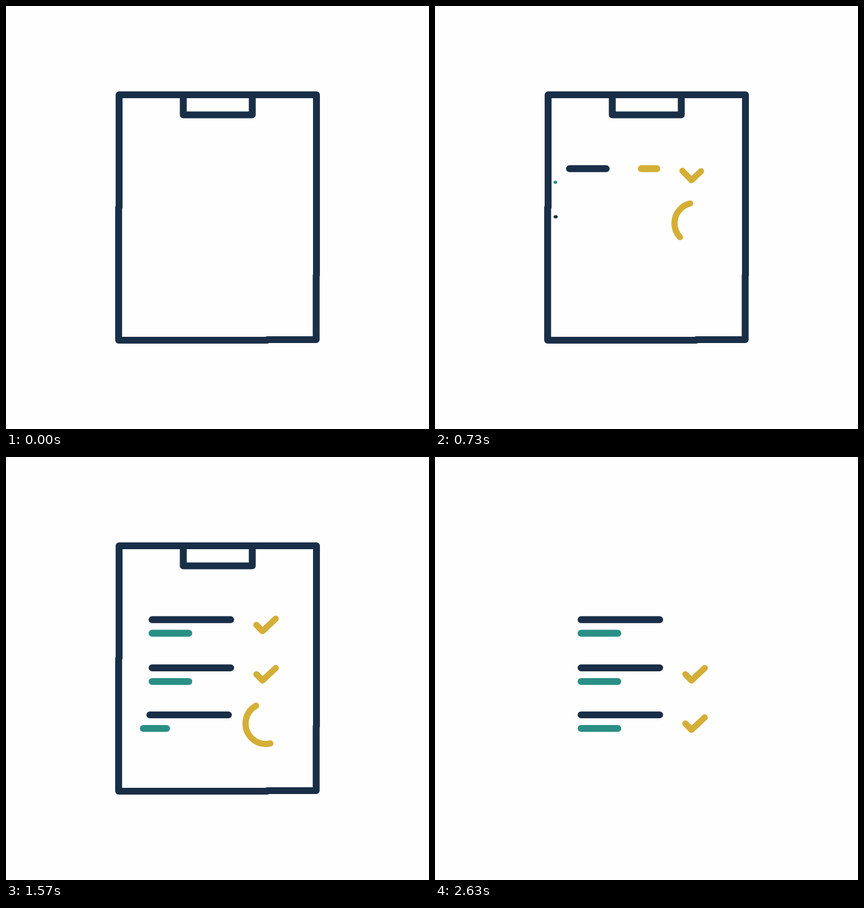
Animation, 748 px wide and 748 px high, one loop 3030 ms. Source, as an HTML page:

```html
<!DOCTYPE html>
<html lang="en">
<head>
<meta charset="utf-8">
<title>Checklist</title>
<style>
  html, body { margin: 0; width: 100%; height: 100%; overflow: hidden; background: #fefefe; }
  svg { display: block; width: 100vw; height: 100vh; }
  path { fill: none; stroke-linecap: round; stroke-linejoin: round; }
  .navy { stroke: #192e47; }
  .teal { stroke: #2a8f84; }
  .gold { stroke: #d4af37; }
  .check { stroke-width: 11; }
  #board { stroke-width: 12.2; animation: board 3030ms step-end infinite; }
  @keyframes board {
    0% { visibility: visible; }
    86.8%, 100% { visibility: hidden; }
  }
</style>
</head>
<body>
<svg id="stage" viewBox="0 0 748 748">
  <g id="items"></g>
  <g id="board">
    <path class="navy" d="M200 157H549V476H548.5V590H462V591H199.2V356H200Z"/>
    <path class="navy" d="M313.5 157V192.5H435.5V157"/>
  </g>
</svg>
<script>
const LOOP = 3030;
const ENTRY = 210;
const items = document.getElementById('items');
const clamp = v => Math.min(1, Math.max(0, v));
const mix = (a, b, p) => a + (b - a) * p;
const easeOut = (u, power) => 1 - (1 - u) ** power;

function addPath(cls) {
  const el = document.createElementNS('http://www.w3.org/2000/svg', 'path');
  el.setAttribute('class', cls);
  items.append(el);
  return el;
}

function show(el, on) {
  el.style.visibility = on ? 'visible' : 'hidden';
}

// Bars: colour, y, full length, start, duration
const bars = [
  ['navy', 287.7, 139, 498, 669],
  ['teal', 311.7, 65, 716, 573],
  ['navy', 372.8, 139, 716, 573],
  ['teal', 397, 65, 907, 650],
  ['navy', 456, 139, 1052, 728],
  ['teal', 480, 65, 1268, 700]
].map(([cls, y, length, start, duration]) =>
  ({ el: addPath(cls), y, length, start, duration }));

function drawBar({ el, y, length, start, duration }, t) {
  const u = clamp((t - start) / duration);
  show(el, u > 0);
  const x = mix(ENTRY, 258.3, easeOut(u, 2));
  const grow = Math.min(1, (u / 0.6) ** 1.4);
  el.setAttribute('d', `M${x} ${y}h${Math.max(0.01, length * grow)}`);
  el.style.strokeWidth = 12.2 * Math.min(1, 0.3 + u * 6);
}

const dash = addPath('gold');

function drawDash(t) {
  const head = mix(ENTRY, 394, easeOut(clamp((t - 20) / 900), 3));
  const tail = mix(ENTRY, 394, easeOut(clamp((t - 20) / 1040), 1.6));
  const length = head - tail;
  show(dash, length > 0.5);
  dash.setAttribute('d', `M${tail} 287.7H${head}`);
  dash.style.strokeWidth = Math.min(12.2, Math.max(0, length));
}

// One turn of the ring, then into the tick
const TICK = 'M459.5 261A36 36 0 0 0 459.5 333A36 36 0 0 0 459.5 261' +
  'A36 36 0 0 0 437.8 268.2C432 272 430 283 438 292L453.5 308L477 286';

// Time, tail and head along the path
const trims = [
  [80, 0, 0], [120, 0, 42], [155, 8, 82], [185, 17, 120], [270, 112, 195],
  [500, 250, 280], [585, 262, 298], [730, 275, 321], [970, 282.5, 330]
];

const checks = [0, 575, 1385].map((start, row) => {
  const el = addPath('gold check');
  el.setAttribute('d', TICK);
  el.setAttribute('transform', `translate(0 ${row * 87.2})`);
  return { el, start, end: row ? LOOP : 2600 };
});

function drawCheck({ el, start, end }, t) {
  const local = t - start;
  show(el, local > trims[0][0] && t < end);
  const next = trims.findIndex(k => k[0] > local);
  const b = trims[next < 0 ? trims.length - 1 : Math.max(1, next)];
  const a = trims[trims.indexOf(b) - 1];
  const p = clamp((local - a[0]) / (b[0] - a[0]));
  const tail = mix(a[1], b[1], p);
  const head = mix(a[2], b[2], p);
  el.style.strokeDasharray = `${Math.max(0.01, head - tail)} 1000`;
  el.style.strokeDashoffset = -tail;
}

const board = document.getElementById('board').getAnimations()[0];
const origin = performance.now();
if (board) board.startTime = document.timeline.currentTime;

function frame() {
  const t = (performance.now() - origin) % LOOP;
  bars.forEach(bar => drawBar(bar, t));
  drawDash(t);
  checks.forEach(check => drawCheck(check, t));
  requestAnimationFrame(frame);
}
frame();
</script>
</body>
</html>
```
